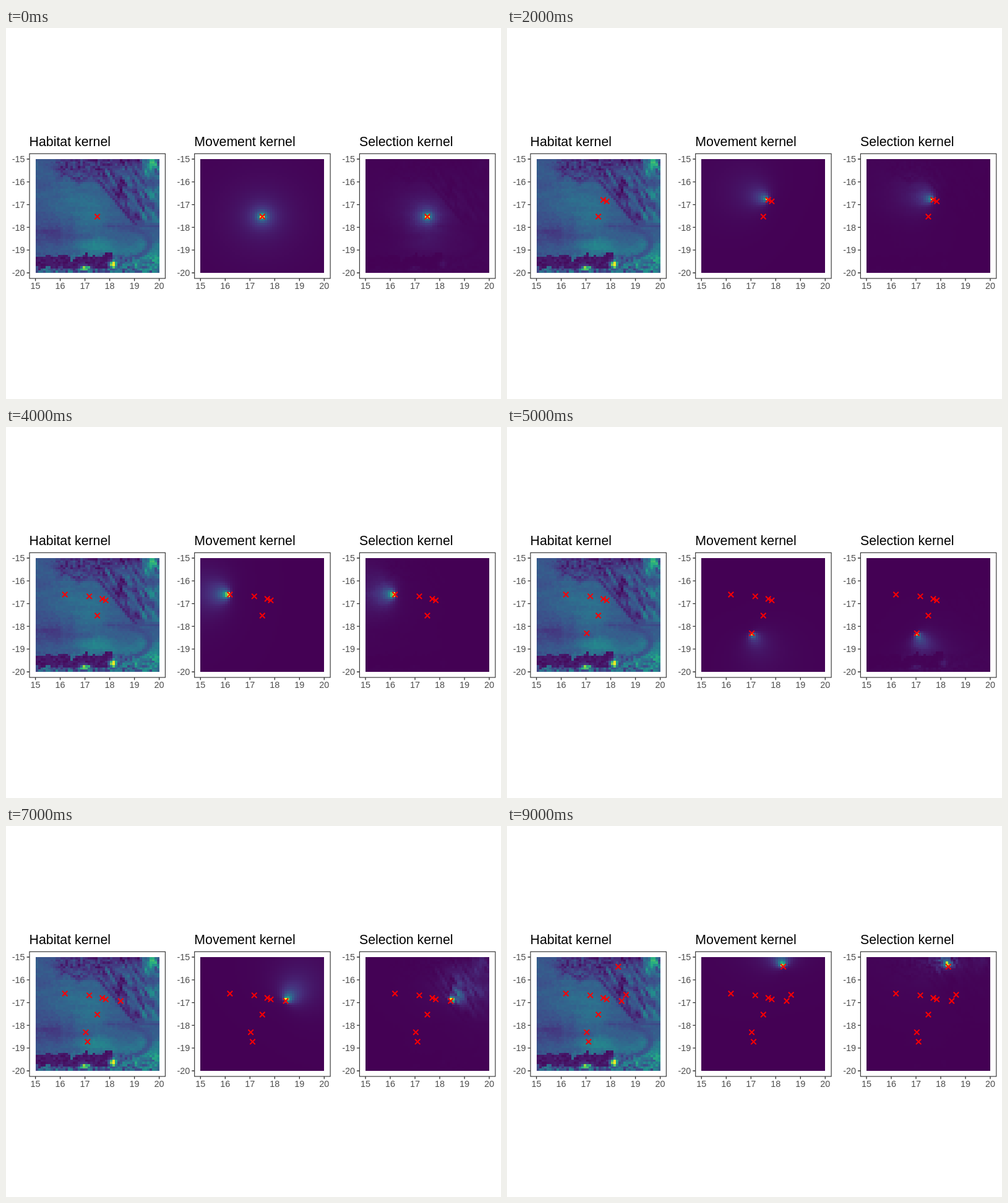
An HTML page with a canvas for the animation above (10 s loop, 800x600 px).

```html
<!DOCTYPE html>
<html lang="en">
<head>
<meta charset="utf-8">
<title>Kernels</title>
<style>
html, body { margin: 0; width: 100%; height: 100%; overflow: hidden; background: #fff; }
canvas, svg { position: absolute; left: 0; top: 0; width: 800px; height: 600px; }
text { font-family: "Liberation Sans", Arial, sans-serif; font-size: 14.4px; fill: #4d4d4d; }
.title { font-size: 21.3px; fill: #000; }
.frame { fill: none; stroke: #333; stroke-width: 1.15; }
.tick { stroke: #333; stroke-width: 1.3; }
.cross { stroke: #f00; stroke-width: 2; fill: none; }
</style>
</head>
<body>
<canvas id="rasters" width="800" height="600"></canvas>
<svg id="plot" viewBox="0 0 800 600"></svg>
<script>
const N = 50, LEFT = 47.6, TOP = 212, W = 200, H = 184, GAP = 266.7;
const UNIT_X = W / 5, UNIT_Y = H / 5;
const STEP_MS = 1000;
const titles = ["Habitat kernel", "Movement kernel", "Selection kernel"];

// Visited positions inside the raster, in pixels
const track = [
  [100, 93], [113.6, 68.4], [108, 66], [87, 61.8], [47.6, 59],
  [81.3, 121.6], [84.2, 136.9], [137.7, 71], [144.9, 61], [132.3, 15.5]
];

const viridis = ["440154", "472d7b", "3b528b", "2c728e", "21918c", "28ae80", "5ec962", "addc30", "fde725"]
  .map(hex => [0, 2, 4].map(i => parseInt(hex.slice(i, i + 2), 16)));
const mix = (a, b, t) => a + (b - a) * t;
const clamp = v => Math.max(0, Math.min(1, v));
const bell = d => Math.exp(-d * d);
const rise = (from, to, v) => {
  const t = clamp((v - from) / (to - from));
  return t * t * (3 - 2 * t);
};

function hash(x, y) {
  let n = Math.imul(x + 101, 374761393) ^ Math.imul(y + 57, 668265263);
  n = Math.imul(n ^ (n >>> 13), 1274126177);
  return ((n ^ (n >>> 16)) >>> 0) / 4294967296;
}

// Smooth noise from -0.5 to 0.5
function noise(x, y) {
  const i = Math.floor(x), j = Math.floor(y);
  const fx = rise(0, 1, x - i), fy = rise(0, 1, y - j);
  return mix(mix(hash(i, j), hash(i + 1, j), fx), mix(hash(i, j + 1), hash(i + 1, j + 1), fx), fy) - .5;
}

// Landscape value for one cell, x and y from 0 to 50
function habitatAt(col, row) {
  const x = col + .5, y = row + .5;
  const grain = hash(col, row) - .5;
  const wx = x + 3 * noise(x * .35, y * .35), wy = y + 3 * noise(x * .35 + 90, y * .35);
  const spot = (cx, cy, rx, ry) => bell(Math.hypot((wx - cx) / rx, (wy - cy) / ry));

  // Open plain, dim south-west, brighter south-east
  let v = .23 + .09 * spot(20, 22, 13, 11) - .09 * spot(7, 32, 11, 6);
  v += .14 * spot(24, 39, 10, 4) + .17 * spot(46, 43, 9, 8) + .06 * noise(x * .12 + y * .05, y * .5);

  // Northern woodland
  const woods = rise(12, 7, wy + 2 * noise(x * .5, 7)) * rise(6, 11, wx);
  v = mix(v, .13 + .12 * noise(x * .7, y * .7) + .1 * grain, woods);

  // Eastern drainage: slanted streaks beside the main river
  const river = 25 + .78 * (y - 9);
  const east = rise(river - 1, river + 1, x) * rise(30, 26, y) * rise(7, 10, y + x - 25);
  const streak = noise((x - .55 * y) * .7, y * .2) + .5 * noise(x * .9, y * .5);
  v = mix(v, .17 + .3 * streak + .13 * rise(40, 49, x), east);
  if (y > 9 && y < 29) v = mix(v, .06, .8 * bell((x - river) / .9));
  v += .3 * spot(46, 2, 1.6, 5);

  // Southern stream
  const bend = Math.hypot((x - 36) / 10, (y - 37) / 6.5) - 1;
  v = mix(v, .17, .8 * bell(bend * 6) * rise(32, 38, x));
  v = mix(v, .17, .7 * bell(y - 29.4) * rise(25, 30, x));

  // Salt pan with a ragged shore and bright edges
  const south = rise(40, 46, y);
  v += south * (.22 * grain + .12 * noise(x * .5, y * .6));
  const shore = 42.3 + 2.5 * bell((x - 15) / 3) + 3 * noise(x * .6, 3) + grain;
  const floor = 47.6 + 2 * noise(x * .4, 8);
  if (y > shore && y < floor && x < 31) v = .03 + .05 * hash(row, col);
  v += .75 * bell(Math.hypot(x - 31, y - 46.3) / 1.4) + .5 * bell(Math.hypot((x - 20) / 2, y - 48));
  return clamp(v + .035 * grain);
}

const cells = Array.from({ length: N * N }, (_, i) => [i % N, Math.floor(i / N)]);
const habitat = cells.map(([c, r]) => habitatAt(c, r));

// Distance decay weighted towards the current heading
function movement(step) {
  const [px, py] = track[step];
  const prev = track[step - 1];
  const heading = prev && Math.atan2(py - prev[1], px - prev[0]);
  return cells.map(([c, r]) => {
    const dx = (c + .5) * W / N - px, dy = (r + .5) * H / N - py;
    const dist = Math.max(.02, Math.hypot(dx / UNIT_X, dy / UNIT_Y));
    const turn = prev ? Math.exp(1.6 * (Math.cos(Math.atan2(dy, dx) - heading) - 1)) : 1;
    return turn * dist ** -.87 * Math.exp(-dist / 2.5);
  });
}

const ctx = document.getElementById("rasters").getContext("2d");
const tile = document.createElement("canvas");
tile.width = tile.height = N;
const tileCtx = tile.getContext("2d");
ctx.imageSmoothingEnabled = false;

function drawRaster(panel, values) {
  const img = tileCtx.createImageData(N, N);
  const peak = Math.max(...values);
  values.forEach((v, i) => {
    const s = v / peak * 8, k = Math.min(7, Math.floor(s));
    for (let ch = 0; ch < 3; ch++) {
      img.data[i * 4 + ch] = Math.round(mix(viridis[k][ch], viridis[k + 1][ch], s - k));
    }
    img.data[i * 4 + 3] = 255;
  });
  tileCtx.putImageData(img, 0, 0);
  ctx.drawImage(tile, Math.round(LEFT + panel * GAP), TOP, W, H);
}

const svg = document.getElementById("plot");
function add(parent, tag, attrs, text) {
  const el = document.createElementNS(svg.namespaceURI, tag);
  for (const key in attrs) el.setAttribute(key, attrs[key]);
  if (text !== undefined) el.textContent = text;
  return parent.appendChild(el);
}

const crosses = titles.map((title, p) => {
  const g = add(svg, "g", { transform: `translate(${LEFT + p * GAP} ${TOP})` });
  add(g, "text", { class: "title", x: -10, y: -21.5 }, title);
  add(g, "rect", { class: "frame", x: -9.6, y: -8.7, width: 219.4, height: 201.7 });
  for (let i = 0; i <= 5; i++) {
    const x = i * UNIT_X, y = i * UNIT_Y;
    add(g, "path", { class: "tick", d: `M${x} 193v4.3M-9.7 ${y}h-4.3` });
    add(g, "text", { x, y: 210.4, "text-anchor": "middle" }, 15 + i);
    add(g, "text", { x: -17, y: y + 5.1, "text-anchor": "end" }, -15 - i);
  }
  return track.map(([x, y]) => add(g, "path", {
    class: "cross", d: `M${x - 4.2} ${y - 4.2}l8.4 8.4m0 -8.4l-8.4 8.4`
  }));
});

let shown = -1;
function show(step) {
  if (step === shown) return;
  shown = step;
  const move = movement(step);
  ctx.clearRect(0, 0, 800, 600);
  [habitat, move, move.map((v, i) => v * habitat[i])].forEach((values, p) => drawRaster(p, values));
  crosses.forEach(set => set.forEach((el, i) => {
    el.style.display = i <= step ? "" : "none";
  }));
}

const start = performance.now();
function tick() {
  show(Math.floor((performance.now() - start) / STEP_MS) % track.length);
  requestAnimationFrame(tick);
}
tick();
</script>
</body>
</html>
```
